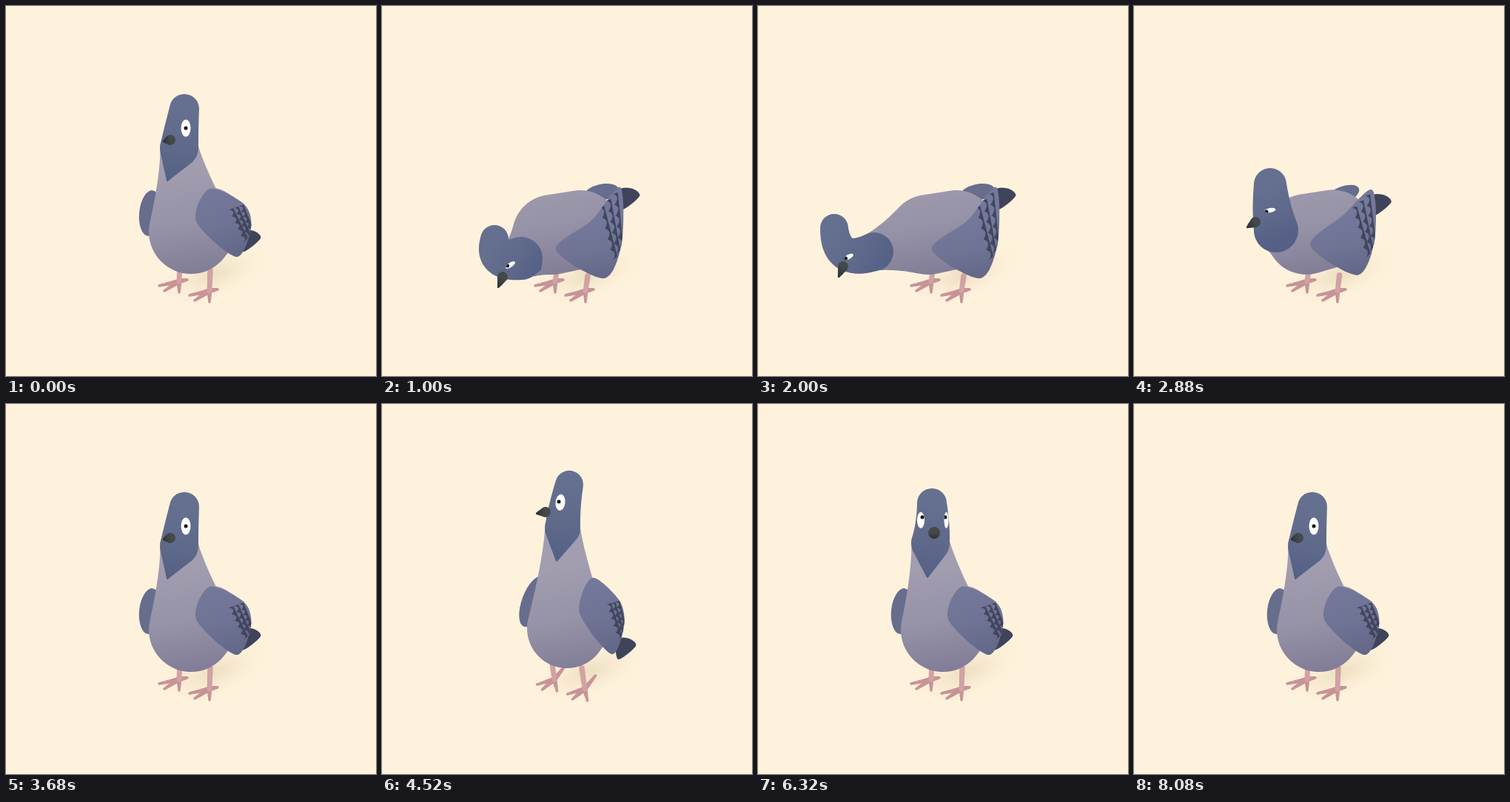
Recreate the animation shown at these times as an HTML page with a canvas. Size 500x500 px, loop 8600 ms.

```html
<!DOCTYPE html>
<html>
<head>
<meta charset="utf-8">
<title>Pigeon</title>
<style>
html, body { margin: 0; width: 100%; height: 100%; overflow: hidden; background: #fff2dc; }
canvas { display: block; width: 100vmin; height: 100vmin; }
</style>
</head>
<body>
<canvas width="500" height="500"></canvas>
<script>
const ctx = document.querySelector('canvas').getContext('2d');
const LOOP = 8600, STEP = 40, GROUND = 390;

// Head poses. Circles are x, y, radius; the eye adds two radii, tilt and pupil offset.
const rest = {
  collar: [234, 192, 26], bend: [237, 166], head: [241, 139, 20], tip: [218, 236],
  bill: [222, 181, 7], point: [213, 183], eye: [243, 165, 6.5, 11.5, 0, 0, 0],
  lean: [0], alert: [0], facing: [0]
};
const front = {
  ...rest, collar: [233, 188, 26], head: [235, 134, 20], tip: [229, 234],
  bill: [238, 174, 8], point: [238, 181], eye: [254.5, 157, 3, 11, 0, -1.5, -4], facing: [1]
};
const alert = {
  ...rest, collar: [244, 168, 24], bend: [246, 140], head: [253, 109, 19], tip: [236, 212],
  bill: [221, 146, 7], point: [209, 148], eye: [241, 133, 6.5, 11, .1, -2, -1], alert: [1]
};
const crouch = {
  ...rest, collar: [192, 303, 30], bend: [185, 274], head: [184, 241, 22], tip: [214, 308],
  bill: [164, 292, 7], point: [153, 299], eye: [184, 276, 7.5, 3, -.15, -5, 2], lean: [.85]
};
const bent = {
  ...rest, collar: [188, 341, 29], bend: [147, 350], head: [152, 315, 19], tip: [214, 356],
  bill: [163, 366, 7], point: [157, 380], eye: [173.5, 350, 7.5, 3, -.6, -4, 1], lean: [1]
};
const reach = {
  ...bent, collar: [157, 332, 26], bend: [106, 352], head: [103, 300, 19], tip: [180, 340],
  bill: [115, 352, 7], point: [109, 366], eye: [122.5, 339, 7, 3, -.5, -4, 2]
};

const keys = [
  [0, rest], [40, rest], [440, crouch], [840, bent], [1480, bent], [1840, reach], [2500, reach],
  [2880, crouch], [3200, rest], [3680, rest], [4250, alert], [5480, alert], [6080, front],
  [7000, front], [7720, rest], [LOOP, rest]
];

// Torso parts at rest, leaning forward and standing tall, blended by lean and alert.
const torso = {
  belly: [[250, 305, 57], [230, 309, 54], [250, 303, 54]],
  rump: [[274, 291, 46], [268, 302, 53], [275, 287, 43]],
  tail: [[344, 314], [348, 257], [343, 327]],
  farWing: [[195, 280, 15, 31, .1], [296, 252, 11, 24, 1.35], [204, 267, 15, 36, .35]],
  shoulder: [[275, 247], [284, 289], [284, 235]],
  wingTip: [[322, 268], [322, 245], [321, 266]],
  wingSide: [[331, 300], [324, 320], [327, 300]],
  wingEnd: [[311, 339], [300, 368], [310, 338]],
  wingFront: [[257, 291], [235, 329], [267, 282]]
};

const toes = [[-27, 6], [-20, 13], [0, 15], [11, -2]];

const lerp = (a, b, k) => a.map((v, i) => v + (b[i] - v) * k);
const pulse = (t, centre, half) => Math.abs(t - centre) < half ? Math.cos((t - centre) / half * Math.PI / 2) ** 2 : 0;

// Monotone cubic interpolation, so poses flow through keys without overshoot.
function ease(t, part) {
  const i = keys.findIndex(k => k[0] > t) - 1;
  const near = [-1, 0, 1, 2].map(d => keys[Math.max(0, Math.min(keys.length - 1, i + d))]);
  const times = near.map(k => k[0]), values = near.map(k => k[1][part]);
  const span = times[2] - times[1], u = (t - times[1]) / span;
  return values[1].map((a, n) => {
    const slope = j => times[j + 1] > times[j] ? (values[j + 1][n] - values[j][n]) / (times[j + 1] - times[j]) : 0;
    const tangent = (p, q) => p * q > 0 ? 2 * p * q / (p + q) : 0;
    const s = slope(1), m0 = tangent(slope(0), s), m1 = tangent(s, slope(2)), b = values[2][n];
    return a + (b - a) * u * u * (3 - 2 * u) + span * u * (1 - u) * (m0 * (1 - u) - m1 * u);
  });
}

function fill(path, color) {
  ctx.fillStyle = color;
  ctx.fill(path);
}

// Sweeps a circle along a quadratic curve; flare above 1 narrows it early.
function tube(path, from, to, bend = lerp(from, to, .5), flare = 1) {
  for (let i = 0; i <= 32; i++) {
    const k = i / 32, [x, y] = lerp(lerp(from, bend.concat(0), k), lerp(bend.concat(0), to, k), k);
    const r = to[2] + (from[2] - to[2]) * (1 - k) ** flare;
    path.moveTo(x + r, y);
    path.arc(x, y, r, 0, 7);
  }
  return path;
}

function smooth(points) {
  const path = new Path2D(), n = points.length;
  path.moveTo(...points[0]);
  points.forEach((b, i) => {
    const a = points[(i + n - 1) % n], c = points[(i + 1) % n], d = points[(i + 2) % n];
    path.bezierCurveTo(b[0] + (c[0] - a[0]) / 7, b[1] + (c[1] - a[1]) / 7,
      c[0] - (d[0] - b[0]) / 7, c[1] - (d[1] - b[1]) / 7, ...c);
  });
  return path;
}

function ellipse(x, y, rx, ry, tilt = 0) {
  const path = new Path2D();
  path.ellipse(x, y, rx, ry, tilt, 0, 7);
  return path;
}

function gradient(a, b, ...colors) {
  const g = ctx.createLinearGradient(a[0], a[1], b[0], b[1]);
  colors.forEach((c, i) => g.addColorStop(i / (colors.length - 1), c));
  return g;
}

function drawShadow() {
  ctx.save();
  ctx.translate(280, 362);
  ctx.rotate(-.35);
  ctx.scale(1, .42);
  const g = ctx.createRadialGradient(0, 0, 10, 0, 0, 90);
  g.addColorStop(0, '#e6d7b5a0');
  g.addColorStop(1, '#fff2dc00');
  fill(ellipse(0, 0, 90, 90), g);
  ctx.restore();
}

function drawFoot(x, y, lean, alert) {
  const ankle = [x - alert, y, 3.4];
  toes.forEach(([dx, dy], i) => {
    const end = [x + dx + 2.5 * alert, y + dy + alert * (i === 3 ? -16 : 1), 1.8];
    fill(tube(new Path2D(), ankle, end), '#c89398');
  });
  const hip = [x + 1 + 2 * lean - 6 * alert, y - 28 + 8 * lean, 3.8];
  fill(tube(new Path2D(), hip, ankle), '#d0a2a4');
}

function drawWing(shoulder, tip, side, end, front) {
  const shape = smooth([shoulder, tip, side, end, front]);
  const top = lerp(front, tip, .68), bottom = lerp(end, side, .5), rows = 3, teeth = 5;
  ctx.save();
  fill(shape, gradient(shoulder, end, '#74789a', '#6f7394', '#626788'));
  ctx.clip(shape);
  for (let row = 0; row < rows; row++) {
    const a = lerp(top, tip, row / rows), b = lerp(bottom, side, row / rows), bar = new Path2D();
    bar.moveTo(...a);
    for (let i = 0; i < teeth; i++) {
      const mid = lerp(a, b, (i + .3) / teeth);
      bar.quadraticCurveTo(mid[0] + 9, mid[1] - 1, ...lerp(a, b, (i + 1) / teeth));
    }
    bar.lineTo(b[0] + 6, b[1] - 6);
    bar.lineTo(a[0] + 6, a[1] - 2);
    fill(bar, '#41465e');
  }
  ctx.restore();
}

function drawEye(x, y, rx, ry, tilt, px, py) {
  const white = ellipse(x, y, rx, ry, tilt);
  ctx.save();
  fill(white, '#fff');
  ctx.clip(white);
  fill(ellipse(x + px, y + py, 2.5, 2.5), '#111');
  ctx.restore();
}

function draw(t) {
  const [lean] = ease(t, 'lean'), [tall] = ease(t, 'alert'), [facing] = ease(t, 'facing');
  const part = name => {
    const [base, low, high] = torso[name];
    return base.map((v, i) => v + lean * (low[i] - v) + tall * (high[i] - v));
  };
  const dip = 64 * pulse(t, 1240, 240) + 73 * pulse(t, 2240, 240);
  const stretch = 1 + .118 * pulse(t, 3160, 260) + .1 * pulse(t, 4160, 360) + .09 * pulse(t, 5240, 460);
  const headPart = (name, share = 1) => {
    const [x, y, ...more] = ease(t, name);
    return [x - .12 * dip * share, y + dip * share, ...more];
  };

  ctx.fillStyle = '#fff2dc';
  ctx.fillRect(0, 0, 500, 500);
  drawShadow();
  drawFoot(234, 372, lean, tall);
  drawFoot(275, 385, lean, tall);

  ctx.save();
  ctx.translate(0, GROUND * (1 - stretch));
  ctx.scale(1, stretch);

  const [tx, ty] = part('tail');
  fill(smooth([[tx, ty], [tx - 9, ty - 10], [tx - 26, ty - 9], [tx - 24, ty + 18]]), '#40445a');
  fill(ellipse(...part('farWing')), '#676d8d');

  const collar = headPart('collar', .3), belly = part('belly');
  const trunk = tube(new Path2D(), part('rump'), belly);
  tube(trunk, belly, collar, undefined, 1.3);
  fill(trunk, gradient([230, 220], [255, 368], '#a29daf', '#9692a7', '#7f7b95'));
  drawWing(...['shoulder', 'wingTip', 'wingSide', 'wingEnd', 'wingFront'].map(part));

  const head = headPart('head'), tip = [...headPart('tip', .3), 1];
  const hood = tube(new Path2D(), collar, head, headPart('bend'));
  tube(hood, collar, tip);
  fill(hood, gradient(head, tip, '#657090', '#5f6a8b', '#546085'));

  const bill = headPart('bill'), point = [...headPart('point'), 1.2];
  fill(tube(new Path2D(), bill, point), gradient(bill, point, '#444a4a', '#2e3333'));
  drawEye(...headPart('eye'));
  if (facing > .05) drawEye(220, 157, 5 * facing, 11, 0, 2, -4);
  ctx.restore();
}

function frame() {
  draw(Math.floor(performance.now() % LOOP / STEP) * STEP);
  requestAnimationFrame(frame);
}
frame();
</script>
</body>
</html>
```
